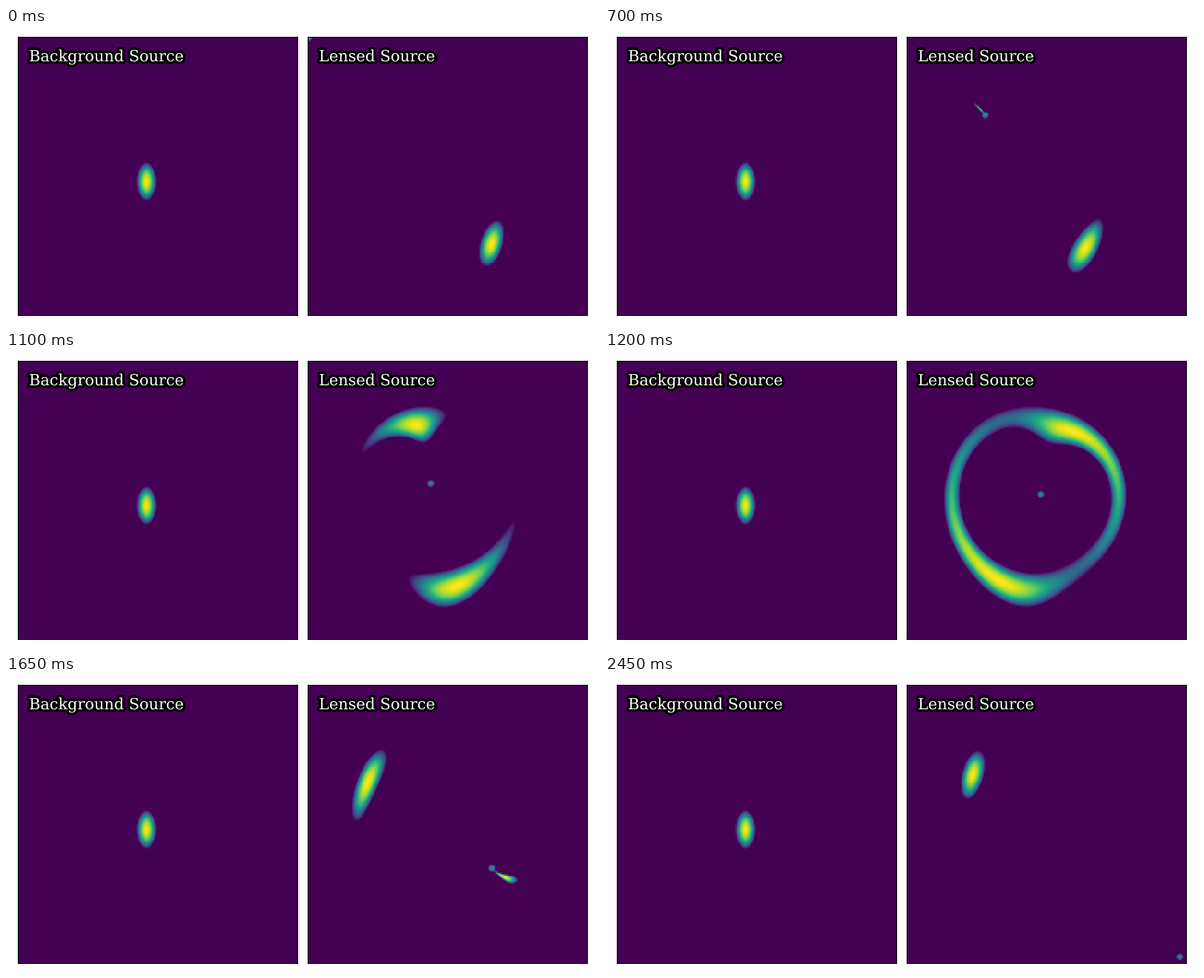
Recreate the animation shown at these times as a matplotlib script. Size 800 by 400 pixels, loop 2.5 s.

```python
import numpy as np
import matplotlib.pyplot as plt
from matplotlib import patheffects
from matplotlib.animation import FuncAnimation

WIDTH, HEIGHT, DPI = 800, 400, 100
FRAMES, INTERVAL = 50, 50
HALF = 2.5          # half-width of the field of view
EINSTEIN = 1.5      # Einstein radius of the lens
GRID = 200

axis = np.linspace(-HALF, HALF, GRID)
X, Y = np.meshgrid(axis, axis)


def paraboloid(x, y, a, b, peak=1.0):
    """Elliptical blob that falls to zero at semi-axes a and b."""
    return peak * np.clip(1 - (x / a) ** 2 - (y / b) ** 2, 0, None)


def source(x, y):
    return paraboloid(x + 0.2, y + 0.1, 0.175, 0.35)


def lensed(frame):
    """Source seen through an isothermal lens moving down the diagonal."""
    pos = -HALF + 2 * HALF * frame / FRAMES
    dx, dy = X - pos, Y + pos
    r = np.maximum(np.hypot(dx, dy), 1e-6)
    image = source(X - EINSTEIN * dx / r, Y - EINSTEIN * dy / r)
    return image + paraboloid(dx, dy, 0.07, 0.07, peak=0.5)


def add_panel(left, title, data):
    ax = fig.add_axes([left / WIDTH, 12 / HEIGHT, 377 / WIDTH, 376 / HEIGHT])
    ax.set(xticks=[], yticks=[])
    image = ax.imshow(data, origin="lower", extent=[-HALF, HALF] * 2,
                      cmap="viridis", vmin=0, vmax=1,
                      interpolation="nearest", aspect="auto")
    ax.text(0.04, 1 - 33 / 376, title, transform=ax.transAxes,
            family="DejaVu Serif", size=15, color="white",
            path_effects=[patheffects.withStroke(linewidth=5,
                                                 foreground="black")])
    return image


fig = plt.figure(figsize=(WIDTH / DPI, HEIGHT / DPI), dpi=DPI)
add_panel(16, "Background Source", source(X, Y))
view = add_panel(407, "Lensed Source", lensed(0))


def update(frame):
    view.set_data(lensed(frame))
    return [view]


anim = FuncAnimation(fig, update, frames=FRAMES, interval=INTERVAL,
                     repeat=True, repeat_delay=0)
plt.show()
```
